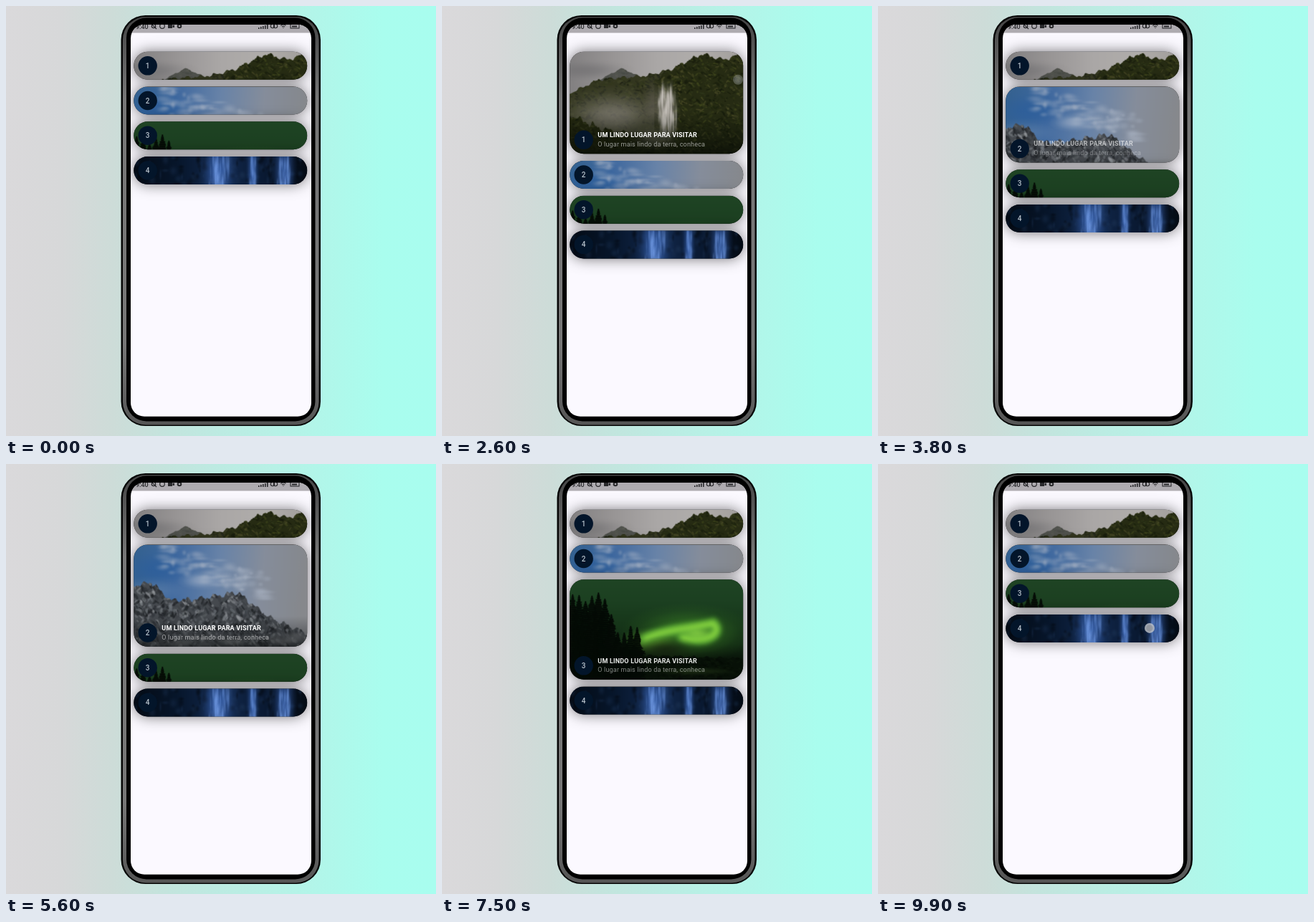
Recreate the animation shown at these times as an HTML page with a canvas. Size 600 by 600 pixels, loop 10 s.

```html
<!DOCTYPE html>
<html lang="pt">
<head>
<meta charset="utf-8">
<title>Expanding cards</title>
<style>
html, body { margin: 0; width: 100%; height: 100%; overflow: hidden; background: #d9d9db; }
canvas { display: block; }
</style>
</head>
<body>
<canvas id="stage" width="600" height="600"></canvas>
<script>
const ctx = document.getElementById('stage').getContext('2d');
const LOOP = 10000, STEP = 100, MOVE = 500;
const LEFT = 178.3, WIDTH = 242, TOP = 63.8, CLOSED = 39, OPEN = 142.5, GAP = 9.7;

// times when each card starts to open and to close
const cards = [
  { paint: valley, open: 300, close: 2650 },
  { paint: peaks, open: 3500, close: 6175 },
  { paint: aurora, open: 7050, close: 9000 },
  { paint: falls, open: LOOP, close: 2 * LOOP }
];

let seed = 7;
const rnd = () => (seed = seed * 16807 % 2147483647) / 2147483647;
const clamp = v => Math.max(0, Math.min(1, v));
const smooth = v => v * v * (3 - 2 * v);

// evenly spaced colours along a line
function gradient(g, x0, y0, x1, y1, ...colors) {
  const fill = g.createLinearGradient(x0, y0, x1, y1);
  colors.forEach((c, i) => fill.addColorStop(i / (colors.length - 1), c));
  return fill;
}

function box(g, fill, x, y, w, h, r = 0) {
  g.fillStyle = fill;
  g.beginPath();
  g.roundRect(x, y, w, h, r);
  g.fill();
}

// soft elliptical spot
function glow(g, x, y, rx, ry, rgb, alpha) {
  g.save();
  g.translate(x, y);
  g.scale(rx, ry);
  const fill = g.createRadialGradient(0, 0, 0, 0, 0, 1);
  for (let d = 0; d <= 1; d += .25) fill.addColorStop(d, `rgba(${rgb},${alpha * (1 - smooth(d))})`);
  g.fillStyle = fill;
  g.fillRect(-1, -1, 2, 2);
  g.restore();
}

// rough skyline through a few points, filled down and textured with small strokes
function ridge(g, keys, rough, fill, colors, size, slant) {
  const [x0] = keys[0], [x1] = keys.at(-1);
  const path = new Path2D();
  path.moveTo(x0, 160);
  for (let x = x0; x <= x1; x++) {
    const i = Math.max(1, keys.findIndex(k => k[0] >= x));
    const [ax, ay] = keys[i - 1], [bx, by] = keys[i];
    const wave = Math.sin(x * .32) + Math.sin(x * .71 + 1) * .6 + rnd() - .5;
    path.lineTo(x, ay + (by - ay) * (x - ax) / (bx - ax) + wave * rough);
  }
  path.lineTo(x1, 160);
  g.save();
  g.clip(path);
  box(g, fill, 0, 0, WIDTH, 143);
  for (let i = 0; i < (x1 - x0) * 9; i++) {
    g.fillStyle = colors[i % colors.length];
    g.globalAlpha = .2 + rnd() * .5;
    g.beginPath();
    g.ellipse(x0 + rnd() * (x1 - x0), rnd() * 143, size * (.4 + rnd()), size * (.2 + rnd() * .4),
      (rnd() < .35 ? -slant : slant) + rnd() - .5, 0, 7);
    g.fill();
  }
  g.restore();
}

// falling water: thin fading strands that spread downwards
function water(g, x, y, w, h, rgb, alpha) {
  for (let i = 0; i < w * 4; i++) {
    const off = rnd() + rnd() - 1;
    glow(g, x + off * w * .6, y + h * (.15 + rnd() * .75), 1 + rnd() * 2, h * (.1 + rnd() * .25), rgb, alpha * rnd());
  }
}

function valley(g) {
  box(g, gradient(g, 0, 0, WIDTH, 0, '#828081', '#989595', '#aaa7a6', '#b0adab', '#a19e9b'), 0, 0, WIDTH, 143);
  glow(g, 25, 26, 70, 16, '105,104,106', .5);
  ridge(g, [[36, 42], [72, 23], [110, 40]], .6, '#50524d', ['#41443d', '#5a5b53'], 3, .5);
  ridge(g, [[0, 58], [40, 39], [110, 33], [150, 22]], 1.5, '#33361f',
    ['#20251a', '#414428', '#343a1c', '#191d11'], 3, .5);
  glow(g, 60, 90, 85, 45, '140,135,128', .7);
  ridge(g, [[0, 88], [45, 108], [125, 122]], 3, '#23270f', ['#14180c', '#3d4120', '#2b311a'], 3, .5);
  ridge(g, [[118, 40], [150, 20], [184, 3], [215, 11], [242, 3]], 1.8, '#262b13',
    ['#12170a', '#434a1e', '#30371a', '#1a200d', '#50502a'], 3, .6);
  glow(g, 117, 75, 20, 45, '96,92,82', .7);
  glow(g, 136, 82, 19, 46, '125,120,113', .8);
  water(g, 136, 42, 24, 78, '205,200,194', .75);
  glow(g, 119, 121, 40, 20, '135,130,122', .6);
  box(g, gradient(g, 0, 85, 0, 143, 'rgba(8,12,5,0)', 'rgba(8,12,5,.75)'), 0, 85, WIDTH, 58);
}

function peaks(g) {
  box(g, gradient(g, 0, 0, WIDTH, 25, '#34618f', '#40699f', '#6883a8', '#858d9b', '#86888c'), 0, 0, WIDTH, 143);
  glow(g, 35, 34, 62, 30, '42,93,156', .7);
  for (let i = 0; i < 90; i++) {
    const x = 40 + rnd() * 150;
    glow(g, x, x * .28 + (rnd() - .35) * 38, 4 + rnd() * 15, 3 + rnd() * 5, '172,182,198', .3);
  }
  glow(g, 95, 50, 36, 14, '176,188,206', .55);
  glow(g, 25, 64, 60, 20, '100,133,174', .5);
  ridge(g, [[0, 57], [25, 53], [52, 78], [88, 76], [145, 67], [190, 102], [242, 124]], 2.5, '#45494e',
    ['#202327', '#999da1', '#2d3135', '#6f747a', '#181b1e', '#3a3e43'], 4, .9);
  for (let i = 0; i < 24; i++) {
    const x = 60 + rnd() * 180;
    glow(g, x, 132 - x * .05 + rnd() * 16, 12 + rnd() * 22, 4 + rnd() * 6, '125,128,131', .35);
  }
  box(g, gradient(g, 0, 100, 0, 143, 'rgba(24,26,28,0)', 'rgba(24,26,28,.6)'), 0, 100, WIDTH, 43);
}

function tree(g, x, top) {
  g.fillStyle = '#040a05';
  for (let y = top; y < 143; y += 1.5) {
    const w = 1 + Math.min(9, (y - top) * .25) * (.5 + rnd() * .8);
    g.fillRect(x - w, y, w * 2, 1.7);
  }
}

function aurora(g) {
  box(g, gradient(g, 0, 0, 0, 120, '#1f4424', '#1c4021', '#17371a', '#122a14', '#050b05'), 0, 0, WIDTH, 143);
  glow(g, 165, 74, 95, 42, '67,142,40', .65);
  glow(g, 112, 86, 44, 20, '113,190,52', .7);
  g.save();
  g.lineCap = 'round';
  g.filter = 'blur(3px)';
  for (const [w, color] of [[15, '#4f9a30'], [6, '#8edb42']]) {
    g.strokeStyle = color;
    g.lineWidth = w;
    g.beginPath();
    g.moveTo(105, 83);
    g.bezierCurveTo(130, 69, 179, 67, 200, 61);
    g.bezierCurveTo(213, 72, 198, 90, 157, 81);
    g.stroke();
  }
  g.restore();
  glow(g, 178, 75, 26, 11, '147,222,73', .65);
  glow(g, 132, 98, 50, 20, '22,35,16', .85);
  ridge(g, [[0, 104], [150, 107], [242, 110]], 1, '#071007', ['#050b05', '#0d180b'], 3, 0);
  glow(g, 175, 128, 70, 7, '41,62,27', .5);
  for (let x = 4; x < 102; x += 9)
    tree(g, x, 18 + 46 * smooth(clamp((x - 45) / 22)) + rnd() * 14);
}

function falls(g) {
  box(g, gradient(g, 0, 0, WIDTH, 0, '#040b15', '#07162b', '#12284c', '#0a1a33', '#040b14'), 0, 0, WIDTH, 143);
  for (let i = 0; i < 350; i++)
    glow(g, rnd() * WIDTH, rnd() * 143, 2 + rnd() * 6, 3 + rnd() * 8, i % 2 ? '2,6,12' : '26,48,80', .4);
  for (const [x, w] of [[118, 26], [166, 9], [210, 17]]) {
    glow(g, x, 22, w * 1.1, 70, '56,100,182', .75);
    water(g, x, -8, w, 75, '116,158,232', .45);
  }
}

for (const card of cards) {
  card.pic = document.createElement('canvas');
  card.pic.width = WIDTH;
  card.pic.height = 143;
  card.paint(card.pic.getContext('2d'));
}

function text(str, x, y, font, fill, spacing = '0px', align = 'left') {
  ctx.font = font + ' Roboto, sans-serif';
  ctx.letterSpacing = spacing;
  ctx.textAlign = align;
  ctx.fillStyle = fill;
  ctx.fillText(str, x, y);
}

function ring(x, y, r, from = 0, to = 7) {
  ctx.beginPath();
  ctx.arc(x, y, r, from, to);
  ctx.stroke();
}

function phone() {
  box(ctx, gradient(ctx, 0, 0, 600, 0, '#dad9db', '#d7d8d9', '#cddcd8', '#c3e4dd', '#bcebe2',
    '#b7f1e6', '#b0f7ea', '#a9fdee', '#a8fdef'), 0, 0, 600, 600);
  box(ctx, '#050505', 160.5, 13, 278.5, 573, 34);
  box(ctx, gradient(ctx, 0, 15, 0, 585, '#444', '#777', '#777', '#777', '#777', '#555'), 163, 15, 273.5, 569.5, 32);
  box(ctx, '#000', 168, 16.5, 263.5, 563, 28);
}

function statusBar() {
  const ink = '#29292c';
  box(ctx, '#aeabb0', 174, 26, 252, 11.5);
  text('9:40', 181, 32, '500 9px', ink);
  ctx.strokeStyle = ink;
  ctx.lineWidth = 1.2;
  ring(206, 28, 2.7);
  ctx.beginPath();
  ctx.moveTo(202.5, 24.5);
  ctx.lineTo(210, 32);
  ctx.stroke();
  ring(218, 28, 3.3);
  box(ctx, ink, 226, 25.5, 6, 5.5);
  box(ctx, ink, 232.5, 26.5, 2.5, 3.5);
  ctx.lineWidth = 2;
  ring(242, 28, 2.3);
  for (let i = 0; i < 5; i++) box(ctx, ink, 352 + i * 3, 30 - i, 1.6, 2 + i);
  ctx.lineWidth = 1.1;
  for (const x of [372, 376]) ring(x, 28, 2.7);
  for (const r of [.7, 2.7, 5]) ring(387, 31, r, 3.9, 5.5);
  ctx.strokeRect(397, 25.5, 12, 5.5);
  box(ctx, ink, 399, 27.5, 7, 2);
}

// finger mark fading in and out just before a card moves
function touch(t, start, x, y) {
  const p = clamp((t - start + 200) / 170);
  ctx.save();
  ctx.globalAlpha = Math.sin(Math.PI * p);
  box(ctx, 'rgba(190,193,198,.85)', x - 7, y - 7, 14, 14, 7);
  box(ctx, 'rgba(135,138,144,.6)', x - 4.5, y - 4.5, 9, 9, 4.5);
  ctx.restore();
}

function drawCard(card, number, y, t) {
  const shown = clamp((t - card.open) / MOVE) - clamp((t - card.close) / MOVE);
  const h = CLOSED + (OPEN - CLOSED) * smooth(shown), bottom = y + h;
  ctx.save();
  ctx.shadowColor = 'rgba(0,0,0,.55)';
  ctx.shadowBlur = 19;
  box(ctx, '#222', LEFT, y, WIDTH, h, 19.5);
  ctx.restore();
  ctx.save();
  ctx.beginPath();
  ctx.roundRect(LEFT, y, WIDTH, h, 19.5);
  ctx.clip();
  ctx.drawImage(card.pic, LEFT, y);
  box(ctx, '#03152a', 184.5, bottom - 32.7, 26.4, 26.4, 13.2);
  text(number, 197.6, bottom - 16, '500 10px', '#b7c1ca', '0px', 'center');
  ctx.globalAlpha = shown;
  text('UM LINDO LUGAR PARA VISITAR', 217.3, bottom - 23.2, 'bold 9.05px', '#fff', '.16px');
  text('O lugar mais lindo da terra, conheca', 217.3, bottom - 10.5, '9.05px', 'rgba(255,255,255,.56)', '.16px');
  ctx.restore();
  touch(t, card.open, 379, y + 19);
  touch(t, card.close, 413, y + 39);
  return bottom + GAP;
}

function frame(now) {
  const t = Math.floor(now % LOOP / STEP) * STEP;
  phone();
  ctx.save();
  ctx.beginPath();
  ctx.roundRect(174, 26, 252, 546.7, 19);
  ctx.clip();
  box(ctx, '#fbf9ff', 174, 26, 252, 547);
  let y = TOP;
  cards.forEach((card, i) => y = drawCard(card, i + 1, y, t));
  statusBar();
  ctx.restore();
  requestAnimationFrame(frame);
}
requestAnimationFrame(frame);
</script>
</body>
</html>
```
